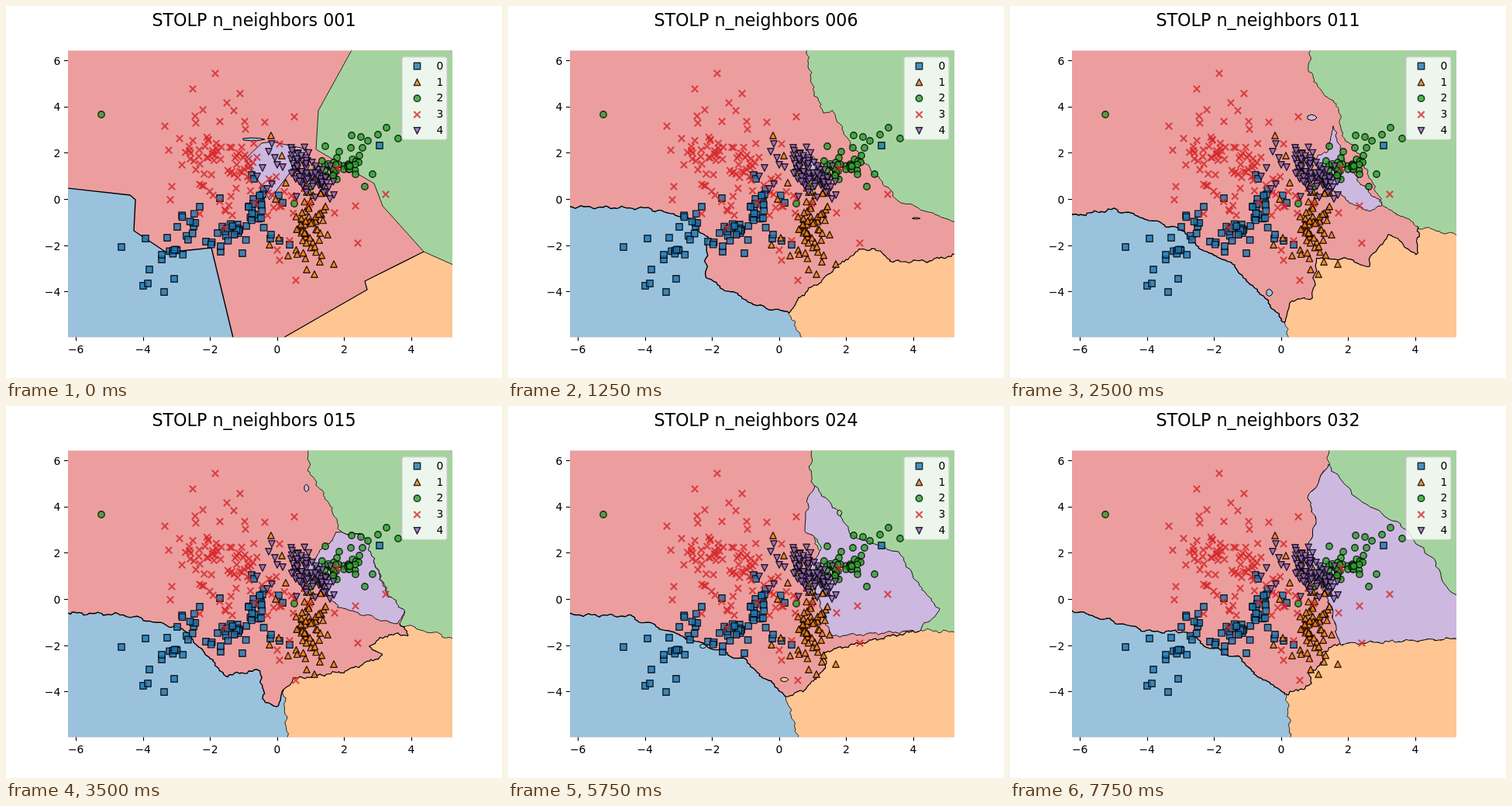
An HTML page that plays this animation: 640x480 px, repeating every 8 s.

```html
<!DOCTYPE html>
<html lang="en">
<head>
<meta charset="utf-8">
<style>
html, body { margin: 0; width: 100%; height: 100%; overflow: hidden; background: #fff; }
svg { display: block; width: 640px; height: 480px; font-family: "DejaVu Sans", sans-serif; }
path { stroke-linejoin: round; }
</style>
</head>
<body>
<svg viewBox="0 0 640 480" xmlns="http://www.w3.org/2000/svg">
  <clipPath id="plot"><rect x="80" y="57.6" width="496" height="369.6"/></clipPath>
  <rect width="640" height="480" fill="#fff"/>
  <text id="title" x="320" y="26" font-size="22.22" text-anchor="middle"></text>
  <g id="axes" font-size="13.89"></g>
  <g id="regions" clip-path="url(#plot)"></g>
  <g id="points" clip-path="url(#plot)"></g>
  <g id="legend" font-size="13.89"></g>
</svg>
<script>
const STEP = 250, COUNT = 32;
const $ = id => document.getElementById(id);
const SOLID = ['#1f77b4', '#ff7f0e', '#2ca02c', '#d62728', '#9467bd'];
const SOFT = ['#9ac2dd', '#ffc593', '#a5d3a0', '#ec9e9e', '#cdb8e0'];

function add(parent, tag, attrs, text) {
  const el = document.createElementNS('http://www.w3.org/2000/svg', tag);
  for (const k in attrs) el.setAttribute(k, attrs[k]);
  if (text !== undefined) el.textContent = text;
  parent.appendChild(el);
  return el;
}
const pairs = flat => flat.flatMap((v, i) => i % 2 ? [] : [[v, flat[i + 1]]]);
const mix = (u, v, k) => u + (v - u) * k;
const toPath = (pts, closed) => 'M' + pts.map(p => p[0].toFixed(1) + ' ' + p[1].toFixed(1)).join('L') + (closed ? 'Z' : '');

// Borders at one neighbour count: blue/red, red/orange, red/green, purple outline,
// plus where the blue/orange and green/orange borders leave the plot
const keys = [];
function key(n, blue, orange, green, purple, outX, outY) {
  const a = pairs(blue), low = a[a.length - 1];
  const c = [low, ...pairs(orange)], right = c[c.length - 1];
  const p = pairs(purple);
  keys.push({ n, a, c, e: [...pairs(green), right], b: [low, [outX, 428]], d: [right, [577, outY]], p: [...p, p[0]] });
}
key(1, [79,235, 160,244, 167,250, 165,290, 207,318, 265,312, 293,428],
  [358,428, 466,366, 463,355, 539,317],
  [446,57, 403,135, 400,185, 475,229, 486,258],
  [343,175, 389,185, 340,250, 309,197, 330,177], 293, 334);
key(6, [79,259, 180,261, 232,273, 257,299, 255,349, 280,365, 320,386, 363,396],
  [377,376, 454,313, 482,316, 495,330, 540,329, 577,321],
  [385,57, 394,110, 408,138, 418,134, 442,180, 502,250, 577,279],
  [375,190, 395,195, 420,235, 385,215], 379, 321);
key(11, [79,271, 135,262, 224,290, 245,313, 285,332, 325,374, 355,408],
  [362,380, 390,377, 396,325, 440,327, 462,338, 466,322, 490,295, 525,322, 527,285],
  [388,57, 385,82, 398,106, 424,130, 428,165, 447,186, 481,258],
  [417,155, 432,205, 481,258, 460,265, 405,230, 393,195, 410,188], 360, 296);
key(15, [79,267, 150,269, 230,288, 282,348, 327,341, 334,384, 350,388, 358,366],
  [370,352, 440,342, 487,322, 470,309, 492,295, 521,295, 508,281],
  [390,57, 391,85, 420,132, 432,163, 460,166, 495,245, 514,265],
  [428,163, 463,167, 488,235, 514,265, 505,282, 430,260, 388,210, 412,180], 363, 300);
key(19, [79,258, 155,267, 190,277, 240,299, 275,334, 340,350, 353,400],
  [375,350, 445,332, 485,320, 490,310, 432,281, 527,283],
  [388,57, 391,75, 374,102, 425,145, 398,185, 500,240],
  [391,75, 410,118, 450,160, 525,223, 528,260, 514,285, 425,275, 388,210, 403,170, 427,155, 374,105], 366, 300);
key(24, [79,269, 155,271, 225,297, 305,328, 359,375],
  [380,367, 410,340, 408,317, 490,298, 533,289],
  [392,57, 390,85, 400,128, 385,150, 405,195, 460,220],
  [396,103, 425,135, 443,167, 505,190, 527,225, 557,265, 530,290, 416,297, 388,212, 406,181, 382,160, 388,118], 374, 292);
key(32, [79,263, 180,291, 228,291, 255,310, 295,325, 325,353, 357,372],
  [388,360, 387,345, 403,330, 403,318, 425,307],
  [411,57, 411,75, 385,120, 395,148, 383,190, 415,260],
  [411,75, 445,118, 500,150, 548,200, 562,235, 577,243, 577,300, 425,307, 415,260, 383,190, 395,148, 385,120], 362, 300);

function resample(pts, count) {
  const at = [0];
  for (let i = 1; i < pts.length; i++)
    at.push(at[i - 1] + Math.hypot(pts[i][0] - pts[i - 1][0], pts[i][1] - pts[i - 1][1]));
  let j = 0;
  return Array.from({ length: count + 1 }, (_, i) => {
    const s = at[at.length - 1] * i / count;
    while (j < pts.length - 2 && at[j + 1] < s) j++;
    const k = (s - at[j]) / (at[j + 1] - at[j] || 1);
    return [mix(pts[j][0], pts[j + 1][0], k), mix(pts[j][1], pts[j + 1][1], k)];
  });
}

const SIZE = { a: 110, b: 20, c: 80, d: 36, e: 90, p: 150 };
function border(name, n) {
  if (n === 1) return keys[0][name];
  let i = 0;
  while (i < keys.length - 2 && keys[i + 1].n <= n) i++;
  const from = keys[i], to = keys[i + 1], size = SIZE[name];
  const k = (n - from.n) / (to.n - from.n);
  const u = resample(from[name], size), v = resample(to[name], size);
  // a position-based wobble makes the ragged edge
  return u.map(([ux, uy], m) => {
    const x = mix(ux, v[m][0], k), y = mix(uy, v[m][1], k);
    if (m === 0 || m === size || x > 575) return [x, y];
    return [
      x + Math.sin(x * .8 + y * .5 + n) + 1.3 * Math.sin(x * .1 + y * .3 + n),
      y + Math.sin(x * .6 - y * .9 + n * 2) + 1.3 * Math.sin(x * .25 - y * .1 + n)
    ];
  });
}

const regions = $('regions');
add(regions, 'rect', { x: 80, y: 57, width: 496, height: 371, fill: SOFT[3] });
const areas = [0, 1, 2].map(c => add(regions, 'path', { fill: SOFT[c] }));
const lines = {};
for (const [name, width] of Object.entries({ a: 1.4, b: .8, c: 1.2, d: .8, e: .8 }))
  lines[name] = add(regions, 'path', { fill: 'none', stroke: '#000', 'stroke-width': width });
const purple = add(regions, 'path', { fill: SOFT[4], stroke: '#000', 'stroke-width': .9 });

// Small enclaves, each seen near one neighbour count
const islands = [];
function island(n, c, x, y, rx, ry) {
  const pts = Array.from({ length: 7 }, (_, i) => {
    const t = i * Math.PI * 2 / 7, r = 1 + .15 * Math.sin(i * 5);
    return [x + rx * r * Math.cos(t), y + ry * r * Math.sin(t)];
  });
  islands.push([n, add(regions, 'path', { d: toPath(pts, true), fill: SOFT[c], stroke: '#000' })]);
}
island(1, 0, 320, 172, 14, 2);
island(6, 2, 527, 274, 5, 1);
island(11, 4, 390, 144, 6, 4);
island(11, 0, 335, 370, 4, 5);
island(15, 4, 388, 106, 3, 5);
island(19, 3, 389, 110, 8, 8);
island(19, 2, 403, 111, 3, 4);
island(24, 2, 428, 138, 3, 4);
island(24, 1, 357, 353, 5, 3);
island(24, 0, 252, 310, 4, 3);

const SHAPES = [
  'M-4.2-4.2H4.2V4.2H-4.2Z',
  'M0-4.2L4.2 4.2H-4.2Z',
  'M-4.2 0A4.2 4.2 0 1 1 4.2 0A4.2 4.2 0 1 1-4.2 0Z',
  'M-4.2-4.2L4.2 4.2M4.2-4.2L-4.2 4.2',
  'M0 4.2L4.2-4.2H-4.2Z'
];
function mark(parent, c, x, y) {
  const cross = c === 3;
  add(parent, 'path', {
    d: SHAPES[c], transform: `translate(${x.toFixed(1)} ${y.toFixed(1)})`,
    fill: cross ? 'none' : SOLID[c], stroke: cross ? SOLID[c] : '#000',
    'stroke-width': cross ? 2.08 : 1.39, 'fill-opacity': .8, 'stroke-opacity': .8
  });
}

// Outlying points are placed, dense parts are seeded clouds
let seed = 11;
function rand() {
  seed = (seed * 16807) % 2147483647;
  return seed / 2147483647;
}
const bell = () => (rand() + rand() + rand() - 1.5) * 2;
const points = $('points');
const place = (c, flat) => pairs(flat).forEach(([x, y]) => mark(points, c, x, y));
function cloud(c, count, x, y, sx, sy) {
  for (let i = 0; i < count; i++) mark(points, c, x + bell() * sx, y + bell() * sy);
}

place(0, [149,311, 177,361, 183,358, 185,340, 204,369, 180,300, 217,352, 201,327, 201,321, 208,299, 221,285,
  250,259, 276,248, 305,319, 277,317, 277,310, 258,304, 341,300, 366,308, 353,303, 317,218, 320,223, 357,254, 482,180]);
cloud(0, 7, 220, 320, 6, 10);
cloud(0, 9, 234, 279, 6, 9);
cloud(0, 24, 287, 290, 16, 11);
cloud(0, 18, 325, 257, 12, 9);
cloud(0, 3, 336, 287, 8, 4);

place(1, [342,167, 356,193, 340,308, 352,299, 348,249, 361,228, 364,322, 388,340, 398,346, 405,330, 423,333, 415,295, 376,220]);
cloud(1, 44, 389, 288, 11, 17);
cloud(1, 14, 397, 249, 11, 11);

place(2, [123,140, 506,171, 491,157, 480,166, 467,174, 458,169, 446,167, 460,183, 445,183, 456,193, 473,217, 463,233,
  430,188, 412,181, 427,196, 372,255, 393,233]);
cloud(2, 15, 443, 208, 9, 6);
cloud(2, 20, 417, 212, 11, 6);

place(3, [270,87, 241,107, 302,113, 285,125, 294,135, 254,134, 244,142, 245,151, 205,155, 276,149, 308,149, 334,150,
  372,143, 309,159, 224,171, 210,186, 214,233, 212,250, 227,205, 255,232, 250,268, 292,270, 282,286, 424,267, 451,258,
  490,243, 454,306, 366,303, 350,315, 353,328, 374,354, 427,209, 353,178]);
cloud(3, 24, 260, 193, 16, 14);
cloud(3, 34, 298, 205, 22, 14);
cloud(3, 7, 277, 253, 9, 10);
cloud(3, 18, 352, 246, 25, 14);

place(4, [343,178, 339,188, 331,209, 324,220, 347,196, 350,205, 343,230, 337,236, 357,208, 368,183, 377,190, 389,200, 418,249]);
cloud(4, 30, 379, 206, 8, 11);
cloud(4, 50, 399, 225, 11, 10);

const axes = $('axes');
const label = v => (v < 0 ? '\u2212' : '') + Math.abs(v);
for (let v = -6; v <= 6; v += 2) {
  const x = 349.8 + 43.28 * v, y = 249.5 - 29.87 * v;
  if (v < 6) {
    add(axes, 'path', { d: `M${Math.round(x) + .5} 427v5`, stroke: '#000', 'stroke-width': 1.1 });
    add(axes, 'text', { x, y: 447.6, 'text-anchor': 'middle' }, label(v));
  }
  if (v > -6) {
    add(axes, 'path', { d: `M75 ${Math.floor(y) + .5}h5`, stroke: '#000', 'stroke-width': 1.1 });
    add(axes, 'text', { x: 70.3, y: y + 5.3, 'text-anchor': 'end' }, label(v));
  }
}
const legend = $('legend');
add(legend, 'rect', { x: 511, y: 65.8, width: 58, height: 106.6, rx: 2.8, fill: '#fff', 'fill-opacity': .8, stroke: '#ccc', 'stroke-opacity': .8, 'stroke-width': 1.39 });
for (let c = 0; c < 5; c++) {
  const y = 77.5 + c * 20.85;
  mark(legend, c, 530.5, y);
  add(legend, 'text', { x: 555.5, y: y + 4.2 }, c);
}

function draw(n) {
  $('title').textContent = 'STOLP n_neighbors ' + String(n).padStart(3, '0');
  const edge = {};
  for (const name in lines) {
    edge[name] = border(name, n);
    lines[name].setAttribute('d', toPath(edge[name]));
  }
  const { a, b, c, d, e } = edge;
  const outlines = [
    [...a, ...b, [79, 428]],
    [...b.slice().reverse(), ...c, ...d, [577, 428]],
    [...e, ...d, [577, 57]]
  ];
  outlines.forEach((pts, i) => areas[i].setAttribute('d', toPath(pts, true)));
  purple.setAttribute('d', toPath(border('p', n), true));
  for (const [at, el] of islands) el.setAttribute('display', Math.abs(n - at) < 2 ? 'inline' : 'none');
}

const start = performance.now();
let shown = 0;
function tick() {
  const n = Math.floor(Math.max(0, performance.now() - start) / STEP) % COUNT + 1;
  if (n !== shown) draw(shown = n);
  requestAnimationFrame(tick);
}
tick();
</script>
</body>
</html>
```
